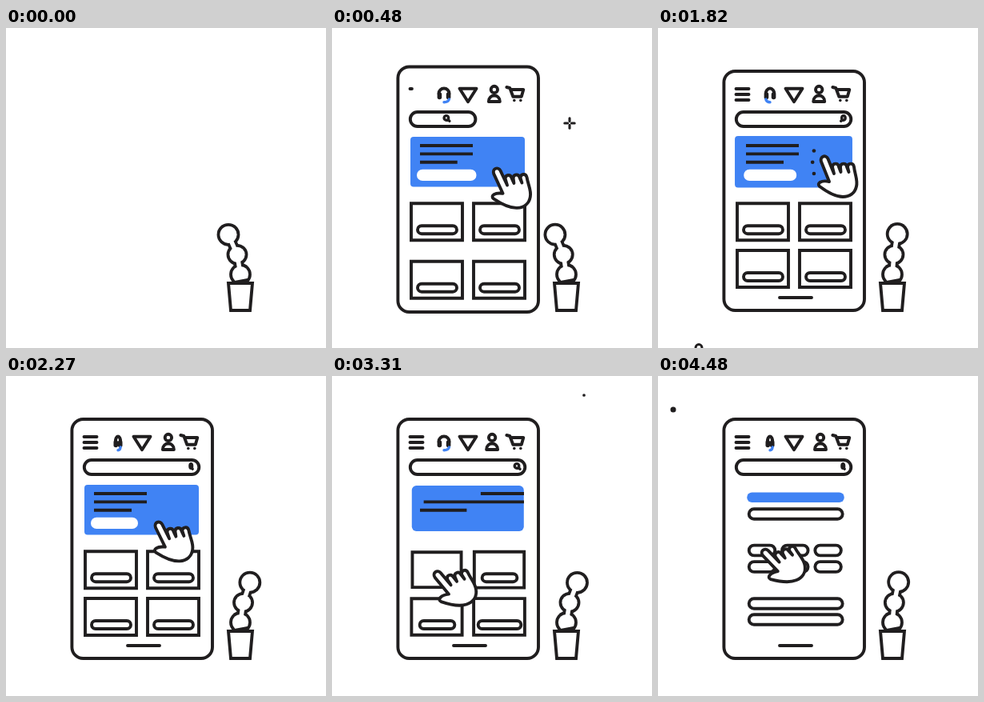
An HTML page with a canvas for the animation above (4.51 s loop, 400 by 400 pixels).

```html
<!DOCTYPE html>
<html lang="en">
<head>
<meta charset="utf-8">
<title>Phone checkout</title>
<style>
  html, body { margin: 0; width: 100%; height: 100%; overflow: hidden; background: #fff; }
  canvas { display: block; width: 100vw; height: 100vh; }
</style>
</head>
<body>
<canvas id="stage" width="400" height="400"></canvas>
<script>
const ctx = document.getElementById('stage').getContext('2d');
const LOOP = 4510, INK = '#201e1f', BLUE = '#4083f4', WHITE = '#fff', STROKE = 3.9;
const TAU = Math.PI * 2;

// Timing: every motion is a span of time shaped by an easing, or a bump around a moment
const clamp = p => Math.max(0, Math.min(1, p));
const mix = (a, b, p) => a + (b - a) * p;
const span = (t, start, length) => clamp((t - start) / length);
const smooth = p => (1 - Math.cos(Math.PI * p)) / 2;
const easeOut = p => 1 - (1 - p) ** 3;
const backIn = p => 2.7 * p ** 3 - 1.7 * p * p;
const backOut = (p, c) => 1 + (c + 1) * (p - 1) ** 3 + c * (p - 1) ** 2;
const move = (t, start, length) => smooth(span(t, start, length));
const enter = (t, start, length) => easeOut(span(t, start, length));
const bump = (t, peak, reach) => 1 - smooth(clamp(Math.abs(t - peak) / reach));
const swell = (t, start, length) => Math.sin(Math.PI * span(t, start, length));

function paint(fill, stroke, width = STROKE) {
  if (fill) { ctx.fillStyle = fill; ctx.fill(); }
  if (stroke) { ctx.strokeStyle = stroke; ctx.lineWidth = width; ctx.stroke(); }
}
function trace(points) {
  points.forEach(([x, y], i) => i ? ctx.lineTo(x, y) : ctx.moveTo(x, y));
}
function line(points, width = STROKE, color = INK) {
  ctx.beginPath();
  trace(points);
  paint(null, color, width);
}
function polygon(points, fill, stroke) {
  ctx.beginPath();
  trace(points);
  ctx.closePath();
  paint(fill, stroke);
}
function dot(x, y, r, color = INK) {
  if (r <= 0) return;
  ctx.beginPath();
  ctx.arc(x, y, r, 0, TAU);
  paint(color);
}
function box(cx, cy, halfW, halfH, r, fill, stroke) {
  if (halfW < 0.5 || halfH < 0.5) return;
  ctx.beginPath();
  ctx.roundRect(cx - halfW, cy - halfH, halfW * 2, halfH * 2, Math.min(r, halfW, halfH));
  paint(fill, stroke);
}
function pill(cx, cy, w, h, grow = 1, fill = null, stroke = INK) {
  box(cx, cy, w * grow / 2, h / 2, h / 2, fill, stroke);
}
function placed(x, y, scale, angle, draw) {
  ctx.save();
  ctx.translate(x, y);
  ctx.rotate(angle);
  ctx.scale(scale, scale);
  draw();
  ctx.restore();
}
// Strokes a path squeezed sideways while its line keeps full weight
function squeezed(x, y, sx, path, width, color = INK) {
  ctx.save();
  ctx.beginPath();
  ctx.translate(x, y);
  ctx.scale(sx, 1);
  path();
  ctx.restore();
  paint(null, color, width);
}

function plant(t) {
  const lean = move(t, 200, 2450) - move(t, 3750, 2450);
  const balls = [
    [mix(278, 306.5, lean), 258.3 - 1.2 * Math.sin(Math.PI * lean), 12.5],
    [mix(289, 297, lean), 283.3, 11.5],
    [293, 308, 12]
  ];
  for (const [grow, neck, color] of [[1.9, 13, INK], [-1.9, 5.5, WHITE]]) {
    line(balls, neck, color);
    balls.forEach(([x, y, r]) => dot(x, y, r + grow, color));
  }
  line([[286, 318], [302, 315]]);
  ctx.lineJoin = 'miter';
  polygon([[278, 319], [308, 319], [305, 353], [281, 353]], WHITE, INK);
  ctx.lineJoin = 'round';
}

function phone(t) {
  const top = mix(353, 54, backOut(span(t, 20, 680), 0.74));
  const bottom = 355 - 2 * move(t, 480, 240);
  box(170.2, (top + bottom) / 2, 87.8, (bottom - top) / 2, 14, WHITE, INK);
  const half = 20 * enter(t, 520, 250);
  if (half) line([[172 - half, 337], [172 + half, 337]]);
}

function headset(turn) {
  squeezed(140, 83, turn, () => ctx.arc(0, -1, 6.5, Math.PI, TAU), 4);
  for (const side of [-5.6, 5.6]) {
    squeezed(140, 83, turn, () => trace([[side, 0], [side, 3.5]]), 5.6);
  }
  squeezed(140, 83, turn, () => {
    ctx.moveTo(6.5, 6);
    ctx.quadraticCurveTo(5, 9.8, 0, 9.8);
  }, 3.4, BLUE);
}

function icons(t, turn) {
  for (let i = 0; i < 3; i++) {
    const p = enter(t, 465 + i * 70, 300);
    if (p) line([[97.5, 76 + 7 * i], [97.5 + 16 * p, 76 + 7 * i]]);
  }
  if (t > 200) headset(turn * enter(t, 190, 180));

  const sway = 201.5 + 1.5 * Math.cos(TAU * (t - 2400) / 2080);
  const shapes = [
    [170, () => polygon([[-10.5, -6.8], [10.5, -6.8], [0, 9.8]], null, INK)],
    [sway, () => {
      ctx.beginPath();
      ctx.arc(0, -5.5, 4.2, 0, TAU);
      paint(null, INK);
      ctx.beginPath();
      ctx.moveTo(-7, 9.5);
      ctx.bezierCurveTo(-7, -0.5, 7, -0.5, 7, 9.5);
      ctx.closePath();
      paint(null, INK);
    }],
    [229.8, () => {
      line([[-11.5, -8.5], [-7.5, -7.5], [-3.5, 3.2], [7, 3.2], [9.5, -5.5], [-6, -5.5]]);
      dot(-2, 8, 1.8);
      dot(6, 8, 1.8);
    }]
  ];
  shapes.forEach(([x, shape], i) => {
    const pop = enter(t, 220 + i * 40, 160);
    if (pop) placed(x, 82.5, pop, 0, shape);
  });
}

function search(t, turn) {
  if (t < 300) return;
  const right = mix(110, 241.3, move(t, 310, 330));
  box((97.8 + right) / 2, 114, (right - 97.8) / 2, 9, 9, WHITE, INK);
  const x = mix(108, 231.5, move(t, 330, 420));
  squeezed(x, 113, turn, () => {
    ctx.arc(-0.5, -0.6, 2.8, 0, TAU);
    trace([[1.5, 1.5], [3.5, 3.3]]);
  }, 3.4);
}

function banner(t) {
  if (t < 150) return;
  const pop = backOut(span(t, 150, 280), 1.2);
  const pulse = 2 * bump(t, 1800, 250);
  const fold = move(t, 3190, 560);
  const top = mix(136, 145.5, fold), bottom = mix(198.5, 158, fold);
  const half = mix(71.5, 58, fold) + 2.8 * move(t, 3930, 250) + pulse;
  box(mix(169.5, 172, fold), (top + bottom) / 2, half * pop, ((bottom - top) + pulse) / 2 * pop,
    mix(4, 7, clamp(fold * 5)), BLUE);

  // Each line grows in, stretches to the edge, then its tail follows
  ctx.save();
  ctx.beginPath();
  ctx.rect(98, 136, 142, 64);
  ctx.clip();
  ctx.lineCap = 'butt';
  for (let i = 0; i < 3; i++) {
    const y = 147 + 10.4 * i, exit = 3060 + i * 110;
    const length = (i < 2 ? 66 : 47) * enter(t, 250 + i * 50, 160);
    const head = mix(110 + length, 242, move(t, exit, 130));
    const tail = mix(110, 244, move(t, exit + 110, 260));
    if (head > tail) line([[tail, y], [head, y]]);
  }
  ctx.restore();

  const width = (59 * enter(t, 260, 180) + 15.5 * bump(t, 480, 200) + 7 * bump(t, 1820, 200))
    * (1 - backIn(span(t, 3050, 220)));
  box(106 + pulse * 0.6 + width / 2, 183.9, width / 2, 7.2, 7.2, WHITE);
}

function cards(t) {
  for (let i = 0; i < 4; i++) {
    const col = i % 2, row = i >> 1, start = 180 + 30 * i;
    const scale = 1 - move(t, 3270 + 10 * i, 300);
    if (t < start || scale < 0.01) continue;
    const rise = row ? 62 * (1 - move(t, 240, 350)) : 90 * (1 - enter(t, 180, 260));
    const cx = 131 + 78 * col, cy = 242.2 + 58.8 * row + rise;
    ctx.lineJoin = 'miter';
    box(cx, cy, 32 * scale, 23 * scale, 0, WHITE, INK);
    ctx.lineJoin = 'round';

    const grow = enter(t, start + 40, 140) * (1 - backIn(span(t, 3080 + 75 * (col + row), 220)));
    const pressed = i === 0 && t > 2640;
    pill(cx + 0.5, cy + 10, 49, 10, grow, pressed ? BLUE : WHITE, pressed ? BLUE : INK);
  }
}

function form(t) {
  const grow = n => enter(t, 3470 + n * 30, 330);
  [172.5, 284.5, 304.5].forEach((y, i) => pill(172.2, y, 117, 12.5, grow(i * 2)));
  for (let i = 0; i < 6; i++) {
    pill(130 + 41.3 * (i % 3), i < 3 ? 218 : 238.5, 32.5, 12.8, grow(1 + i * 0.7));
  }
}

function hand(t) {
  if (t < 200) return;
  const toCard = move(t, 2150, 370), settle = move(t, 2780, 220), lift = move(t, 4080, 320);
  const x = 208 - 2 * bump(t, 480, 240) - 72 * toCard - 5 * settle + 2 * lift;
  const y = 162 + 180 * (1 - enter(t, 200, 500)) + 92 * toCard - 8 * settle
    + 3 * move(t, 3310, 500) - 30.5 * lift;
  const angle = -3 * bump(t, 480, 300) - 18 * toCard - 4 * lift;
  const size = enter(t, 200, 200) - 0.15 * bump(t, 1720, 100) - 0.18 * bump(t, 2760, 190);
  placed(x, y, size, angle * Math.PI / 180, () => {
    ctx.beginPath();
    ctx.moveTo(6, 30);
    ctx.lineTo(-4, 5);
    ctx.bezierCurveTo(-6, -2, 2, -4, 4.5, 1.5);
    ctx.lineTo(12, 20);
    // Three folded fingers, each a little lower and narrower to the right
    for (const left of [10, 20, 29]) {
      ctx.lineTo(left, 12);
      ctx.bezierCurveTo(left, 6.5, left + 7, 6, left + 8, 11.5);
      if (left < 29) ctx.lineTo(left + 10.5, 18);
    }
    ctx.bezierCurveTo(38, 21, 42, 28, 40, 36);
    ctx.bezierCurveTo(38, 45, 31, 49, 23, 49);
    ctx.bezierCurveTo(12, 49, 2, 42, -6, 36);
    ctx.bezierCurveTo(-10, 32, -4, 28, 6, 30);
    ctx.closePath();
    paint(WHITE, INK);
  });
}

// Three marks fanned around a point: dots for the first tap, strokes for the second
function clickMarks(t) {
  const p = span(t, 1690, 280), q = span(t, 2610, 330);
  for (let i = -1; i <= 1; i++) {
    if (p > 0 && p < 1) {
      const reach = mix(0.55, 1.3, easeOut(p));
      dot(208 - (12.5 - 1.5 * Math.abs(i)) * reach, 163 + (4 + 12 * i) * reach,
        2.4 * Math.sin(Math.PI * (0.2 + 0.8 * p)));
    }
    if (q > 0 && q < 1) {
      const at = d => [129.5 + i * (7 + 5 * d), 242 - (10 - 2.5 * Math.abs(i)) * d];
      line([at(move(q, 0.5, 0.5)), at(enter(q, 0, 0.4))]);
    }
  }
}

function sparkle(t, x, y, start, length) {
  const p = span(t, start, length);
  if (p <= 0 || p >= 1) return;
  const inner = 6.5 * p ** 1.3, outer = 2 + 4.5 * enter(p, 0, 0.8);
  for (let i = 0; i < 4; i++) {
    placed(x, y, 1, i * TAU / 4, () => line([[inner, 0], [outer, 0]], 3.1 * Math.min(1, (1 - p) * 5)));
  }
}

function ornaments(t) {
  sparkle(t, 297, 119, 220, 560);
  sparkle(t, 33, 25, 820, 640);
  sparkle(t, 342, 298, 2560, 560);
  sparkle(t, 163, 18, 3540, 680);
  const ring = swell(t, 1480, 560);
  if (ring > 0.01) {
    ctx.beginPath();
    ctx.arc(51, 399.5, 4.2 * ring, 0, TAU);
    paint(null, INK, 3);
  }
  dot(315, 24, 4.3 * swell(t, 2300, 1180));
  dot(19, 42, 5 * swell(t, 3760, 960));
}

function draw(t) {
  ctx.fillStyle = WHITE;
  ctx.fillRect(0, 0, 400, 400);
  ctx.lineCap = ctx.lineJoin = 'round';
  plant(t);
  if (t < 30) return;
  const turn = Math.cos(TAU * (move(t, 300, 2700) + move(t, 3400, 1480)));
  phone(t);
  icons(t, turn);
  search(t, turn);
  cards(t);
  banner(t);
  form(t);
  ornaments(t);
  clickMarks(t);
  hand(t);
}

const began = performance.now();
function tick() {
  draw(Math.max(0, performance.now() - began) % LOOP);
  requestAnimationFrame(tick);
}
draw(0);
requestAnimationFrame(tick);
</script>
</body>
</html>
```
